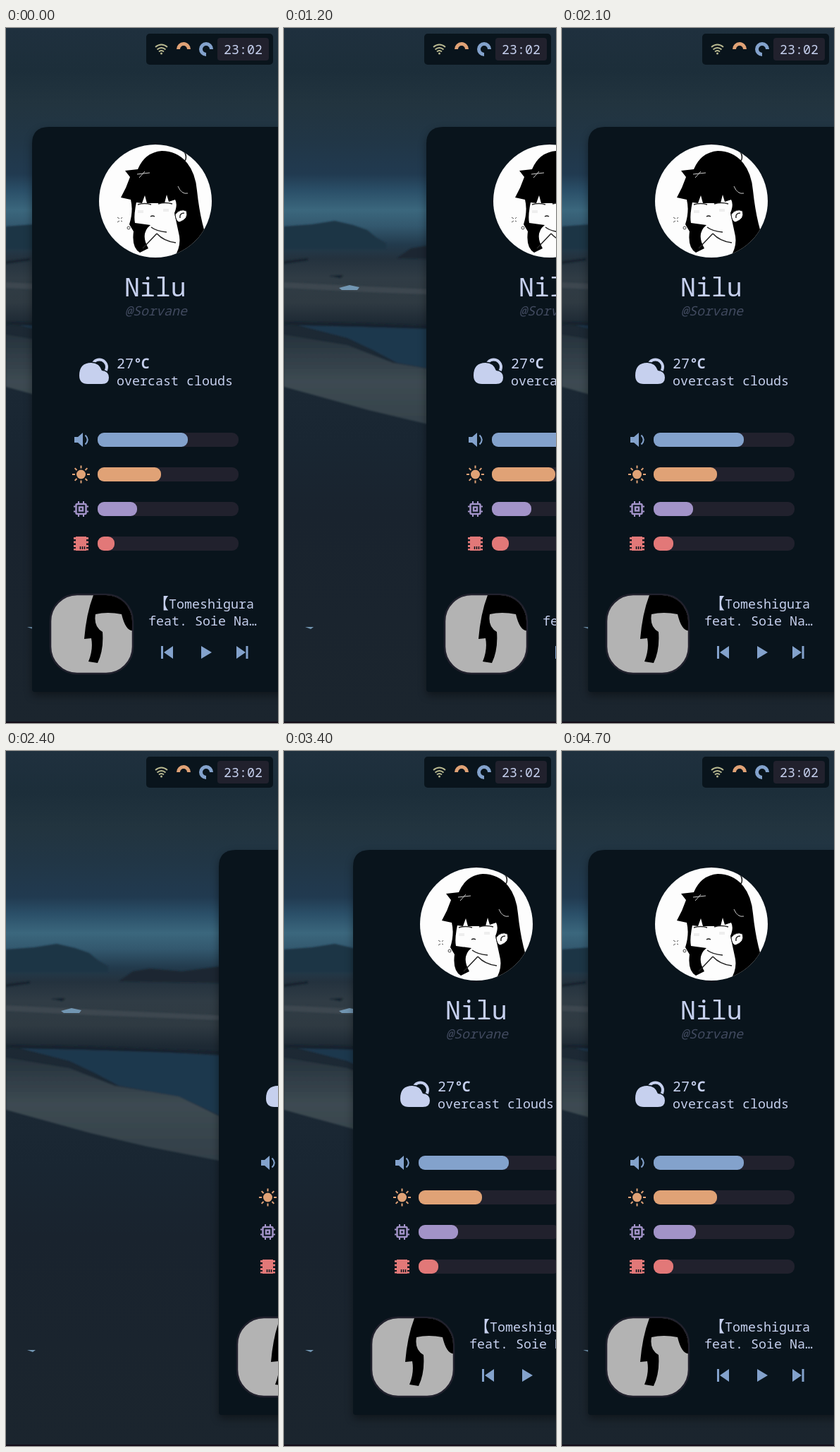
These frames come from a looping animation (386 px wide and 984 px high, 4800 ms). An HTML page:

```html
<!DOCTYPE html>
<html lang="en">
<head>
<meta charset="utf-8">
<title>Sliding dashboard</title>
<style>
html, body { margin: 0; width: 100%; height: 100%; overflow: hidden; background: #1a2530; }
svg { display: block; width: 386px; height: 984px; }
text { font: 500 18.33px "Noto Sans Mono", "DejaVu Sans Mono", "Noto Sans CJK JP", monospace; fill: #c6d0ee; white-space: pre; }
.card { fill: #09141c; filter: drop-shadow(0 5px 6px #0006); }
.track { fill: #21212d; }
.blue { fill: #83a2cc; }
.orange { fill: #e0a276; }
.purple { fill: #a293c8; }
.red { fill: #e27878; }
.ring { fill: none; stroke-width: 5; }
</style>
</head>
<body>
<svg viewBox="0 0 386 984">
  <defs>
    <linearGradient id="sky" x2="0" y2="1">
      <stop offset="0" stop-color="#1f303e"/>
      <stop offset=".06" stop-color="#1c2e3a"/>
      <stop offset=".11" stop-color="#22343f"/>
      <stop offset=".16" stop-color="#213646"/>
      <stop offset=".21" stop-color="#213a50"/>
      <stop offset=".235" stop-color="#2b5069"/>
      <stop offset=".262" stop-color="#3b677d"/>
      <stop offset=".285" stop-color="#33586e"/>
      <stop offset=".312" stop-color="#223a4c"/>
      <stop offset=".332" stop-color="#24323e"/>
      <stop offset=".36" stop-color="#303c45"/>
      <stop offset=".395" stop-color="#2f3a42"/>
      <stop offset=".425" stop-color="#1d2934"/>
      <stop offset=".5" stop-color="#1b2834"/>
      <stop offset=".6" stop-color="#192632"/>
      <stop offset=".7" stop-color="#19232e"/>
      <stop offset="1" stop-color="#1b252e"/>
    </linearGradient>
    <linearGradient id="grass" x2="0" y2="1">
      <stop offset="0" stop-color="#26333d"/>
      <stop offset=".4" stop-color="#3d4a52"/>
      <stop offset="1" stop-color="#303d46"/>
    </linearGradient>
    <filter id="soft"><feGaussianBlur stdDeviation="1"/></filter>
    <clipPath id="face"><circle cx="212" cy="245" r="80"/></clipPath>
    <clipPath id="cover"><rect x="64" y="803" width="115" height="110" rx="37"/></clipPath>
  </defs>

  <!-- landscape -->
  <rect width="386" height="984" fill="url(#sky)"/>
  <g filter="url(#soft)">
    <path d="M0 281L40 278 72 273 98 279 118 286 130 296 145 305V313H0Z" fill="#1e3445"/>
    <path d="M160 326L180 312 204 308 250 312 303 305 386 300V330Z" fill="#1c2833"/>
    <path d="M0 360L120 366 386 378V384L120 374 0 368Z" fill="#3c474f"/>
    <path d="M20 421L200 425 386 436V530L303 516 245 489 160 474 128 457 90 439Z" fill="#1f374d"/>
    <path d="M0 434L90 449 155 474 245 489 303 517 386 540V600L303 580 200 560 120 541 0 508Z" fill="url(#grass)"/>
    <path d="M0 330L34 326V329L0 334ZM64 351L84 350 80 354ZM0 416L110 418 386 428V432L110 423 0 420Z" fill="#17232d"/>
  </g>
  <path d="M78 368L93 364 107 367 104 371H82ZM30 848L42 848 38 851Z" fill="#7296b2"/>
  <rect y="982" width="386" height="2" fill="#140c18"/>

  <!-- status bar -->
  <rect x="199" y="8" width="180" height="44" rx="5" fill="#09141c"/>
  <rect x="300" y="14" width="73" height="32" rx="4" class="track"/>
  <path d="M212 27Q220.500 20 229 27M214.500 30.500Q220.500 25.500 226.500 30.500M217 33.500Q220.500 30.500 224 33.500" fill="none" stroke="#b8b890" stroke-width="2"/>
  <circle cx="220.500" cy="36" r="1.500" fill="#b8b890"/>
  <path class="ring" stroke="#e0a276" d="M244.500 30A7.500 7.500 0 0 1 259.500 30"/>
  <path class="ring" stroke="#83a2cc" d="M291.500 30A7.500 7.500 0 1 0 284 37.500"/>
  <text x="309" y="37">23:02</text>

  <g id="panel">
    <path class="card" d="M61 140H440V940H41Q37 940 37 936V164Q37 140 61 140Z"/>

    <!-- portrait -->
    <circle cx="212" cy="245" r="80" fill="#fdfdfd"/>
    <g clip-path="url(#face)">
      <path d="M240 166Q258 174 255 186Q252 193 241 192" fill="none" stroke="#111" stroke-width="1.500"/>
      <path d="M169 202L187 200Q197 176 221 174Q243 174 257 191Q269 206 271 230Q275 268 284 295L268 326H238Q250 308 245 290L239 262Q244 250 240 243L231 246 228 236 225 248 200 248 197 237 193 248 185 247Q181 266 183 276L205 279Q190 291 202 312L190 318Q178 311 181 288L175 278Q181 259 177 243L163 240Q171 226 176 211Z"/>
      <path d="M240 264Q247 255 256 259Q260 270 246 275Q241 274 240 264Z" fill="#fdfdfd" stroke="#111"/>
      <path d="M247 269Q246 262 253 262M187 250Q197 247 206 250M216 249Q226 246 236 249M205 267Q208 265 211 267M206 282Q214 288 228 289M214 291Q224 302 241 304M214 291L194 312" fill="none" stroke="#222" stroke-width="1.500"/>
      <path d="M186 207L204 205M189 212L197 203M244 224Q249 236 258 234" fill="none" stroke="#ccc"/>
      <path d="M187 260h8M223 258h8" stroke="#eee" stroke-width="4"/>
      <path d="M158 268l3 2M165 268l-2 2M158 275l3-2M165 274l-2-1" stroke="#555"/>
      <circle cx="174" cy="283" r="2" fill="none" stroke="#444"/>
    </g>
    <text x="168" y="380" style="font-size:36.500px">Nilu</text>
    <text x="169" y="407" style="font-style:italic;fill:#414a5f">@Sorvane</text>

    <!-- weather -->
    <g fill="#c6d0ee">
      <circle cx="132.500" cy="480" r="10.500" fill="none" stroke="#c6d0ee" stroke-width="4"/>
      <path d="M116 504Q104 504 104 492Q104 474 121 474Q132 474 136 485Q146 486 146 495Q146 504 136 504Z" stroke="#09141c" stroke-width="3" paint-order="stroke"/>
    </g>
    <text x="157" y="482" style="font-size:20px">27<tspan font-weight="700">℃</tspan></text>
    <text x="157" y="506">overcast clouds</text>

    <!-- sliders -->
    <g id="sliders"></g>
    <g class="blue">
      <path d="M97 579H102L109 573V593L102 587H97Z"/>
      <path d="M112.500 576.500Q119 583 112.500 589.500" fill="none" stroke="#83a2cc" stroke-width="2"/>
    </g>
    <g class="orange">
      <circle cx="106.500" cy="632" r="6.500"/>
      <g id="rays"></g>
    </g>
    <g fill="none" stroke="#a293c8">
      <rect x="99.500" y="674" width="14" height="14" rx="1.500" stroke-width="2.500"/>
      <rect x="104" y="678.500" width="5" height="5" stroke-width="2.500"/>
      <path d="M103 670v4M110 670v4M103 688v4M110 688v4M96 677.500h4M96 684.500h4M113 677.500h4M113 684.500h4" stroke-width="2"/>
    </g>
    <path class="red" d="M99 720H114V740H99ZM96 721h21v3H96ZM96 726.500h21v3H96ZM96 732h21v3H96ZM96 737h21v2.500H96Z"/>
    <path d="M105.500 734v4M108.500 734v4M111.500 734v4" stroke="#09141c" stroke-width="1.500"/>

    <!-- player -->
    <rect x="63" y="802" width="117" height="112" rx="38" fill="#b3b3b3" stroke="#21212d" stroke-width="2.500"/>
    <path clip-path="url(#cover)" d="M124 803H181V853Q170 855 164 830Q144 826 127 830Q124 848 137 855Q139 880 130 899L117 897Q124 880 121 864L111 865Q114 829 124 803Z"/>
    <text x="209" y="822" style="font-size:22px">【</text>
    <text x="231" y="822">Tomeshigura</text>
    <text x="202" y="846">feat. Soie Na…</text>
    <path class="blue" d="M220 875h3v18h-3ZM237 875V893L224 884ZM277 875L292 884 277 893ZM327 875L340 884 327 893ZM340.500 875h3v18h-3Z"/>
  </g>
</svg>
<script>
const LOOP = 4800, STEP = 100, SLIDE = 322, WIDTH = 349;
// Each toggle flips the panel between open and closed.
const toggles = [1138, 1750, 2278, 2850, 3380, 4050];
const panel = document.getElementById("panel");
const sliders = document.getElementById("sliders");
const rays = document.getElementById("rays");

function addRect(parent, attrs) {
  const el = document.createElementNS("http://www.w3.org/2000/svg", "rect");
  for (const key in attrs) el.setAttribute(key, attrs[key]);
  return parent.appendChild(el);
}

const fills = ["blue", "orange", "purple", "red"].map((color, i) => {
  const box = { x: 130, y: 573 + 49 * i, height: 20, rx: 9 };
  addRect(sliders, { ...box, width: 200, class: "track" });
  return addRect(sliders, { ...box, class: color });
});

for (let a = 0; a < 360; a += 45) {
  addRect(rays, { x: 105.5, y: 619.5, width: 2, height: 4, transform: `rotate(${a} 106.5 632)` });
}

const easeOut = p => 1 - (1 - p) ** 3;

function offsetAt(t) {
  const i = toggles.findLastIndex(start => start <= t);
  if (i < 0) return 0;
  const moved = easeOut(Math.min(1, (t - toggles[i]) / SLIDE));
  return WIDTH * (i % 2 ? 1 - moved : moved);
}

function draw(now) {
  const t = Math.floor(now % LOOP / STEP) * STEP;
  const x = Math.round(offsetAt(t));
  panel.setAttribute("transform", `translate(${x})`);
  panel.style.display = x < WIDTH ? "" : "none";
  const widths = [128, 90, t < 4000 ? 56 : 60, t < 1600 ? 24 : 28];
  fills.forEach((fill, i) => fill.setAttribute("width", widths[i]));
}

const begin = performance.now();
function tick() {
  draw(performance.now() - begin);
  requestAnimationFrame(tick);
}
tick();
</script>
</body>
</html>
```
